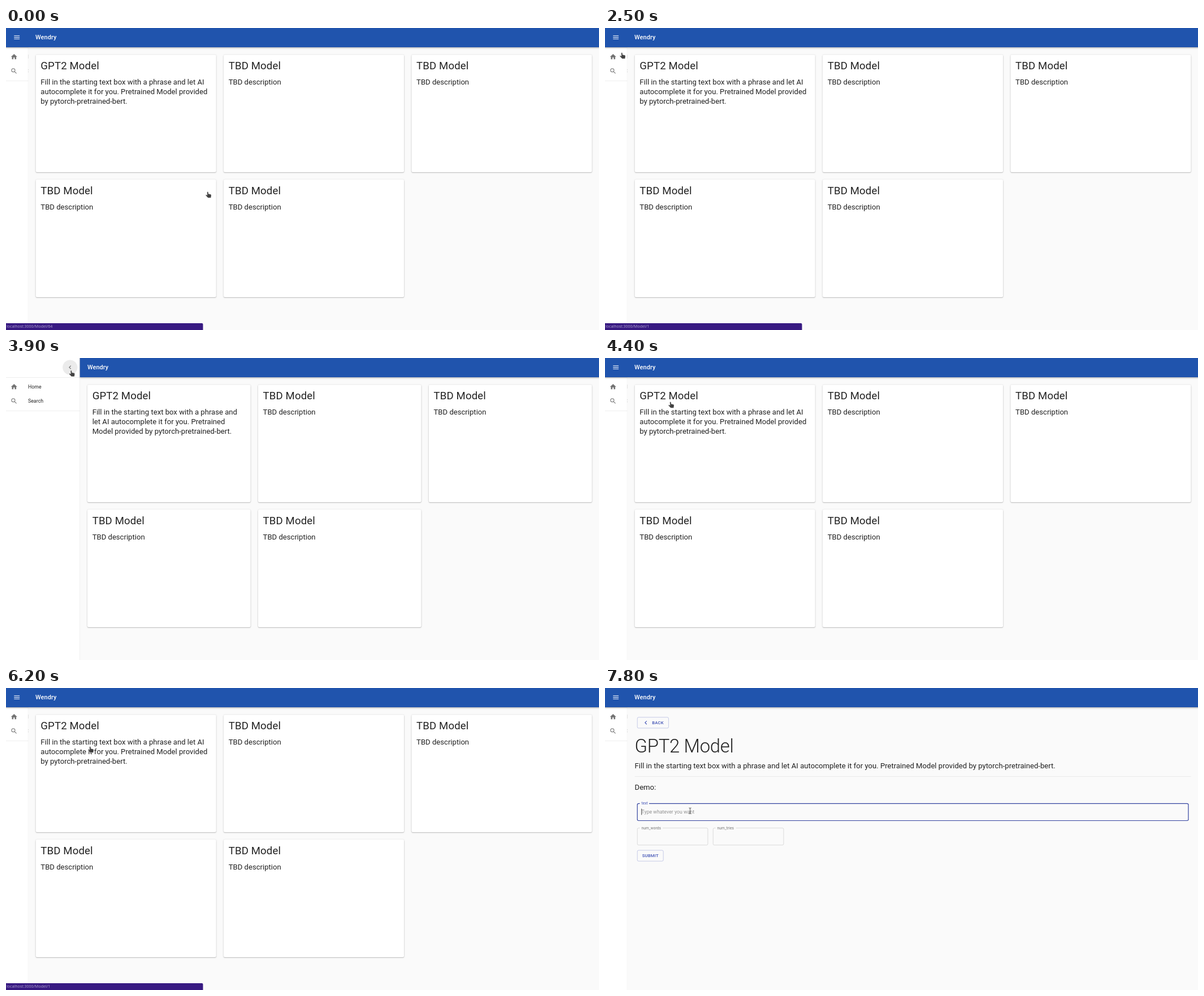
These frames come from a looping animation (1049x534 px, 8 s). An HTML page:

```html
<!DOCTYPE html>
<html lang="en">
<head>
<meta charset="utf-8">
<title>Model gallery</title>
<style>
  html, body { margin: 0; width: 100%; height: 100%; overflow: hidden; background: #fafafa; }
  #stage { display: block; width: 100vw; height: 100vh; font-family: Roboto, sans-serif; }
  #stage text { fill: rgba(0,0,0,.87); white-space: pre; }
  .h2 { font-size: 60px; font-weight: 300; letter-spacing: -.00833em; }
  .h4 { font-size: 34px; letter-spacing: .00735em; }
  .h5 { font-size: 24px; }
  .item { font-size: 16px; letter-spacing: .00938em; }
  .brand { font-size: 20px; font-weight: 500; letter-spacing: .0075em; }
  #stage .brand { fill: #fff; }
  .button { font-size: 14px; font-weight: 500; letter-spacing: .02857em; }
  #stage .button { fill: #3f51b5; }
  .label { font-size: 12px; letter-spacing: .00938em; }
  #stage .label { fill: rgba(0,0,0,.54); }
  .hint { font-size: 16px; }
  #stage .hint { fill: rgba(0,0,0,.42); }
  .card { fill: #fff; filter: drop-shadow(0 1px 1.5px rgba(0,0,0,.2)) drop-shadow(0 1.3px .6px rgba(0,0,0,.2)); }
  .bar { fill: #2054ad; filter: drop-shadow(0 2px 2px rgba(0,0,0,.2)) drop-shadow(0 2px 3px rgba(0,0,0,.14)); }
  .icon { fill: rgba(0,0,0,.54); }
  .rule { fill: #e0e0e0; }
  .line { fill: none; stroke: rgba(0,0,0,.23); }
  .edge { fill: none; stroke: rgba(63,81,181,.5); }
  #stage #url { font: 7px "Noto Sans", "Open Sans", sans-serif; fill: #a99bcb; }
</style>
</head>
<body>
<svg id="stage" viewBox="0 0 1049 534" preserveAspectRatio="none">
  <rect width="1049" height="534" fill="#fafafa"/>
  <!-- page units: a 1920 px wide window -->
  <g transform="translate(-.5 -1) scale(.547)">
    <g id="gallery"></g>

    <g id="detail">
      <rect class="edge" x="105.5" y="96.5" width="101" height="35" rx="4"/>
      <path fill="#3f51b5" transform="translate(121 102)" d="M15.41 7.41L14 6l-6 6 6 6 1.41-1.41L10.83 12z"/>
      <text class="button" x="153" y="119">BACK</text>
      <text class="h2" x="97" y="209.6">GPT2 Model</text>
      <text class="h5" id="about" x="97" y="261.5"></text>
      <rect class="rule" x="97" y="287" width="1799" height="1"/>
      <text class="h5" x="97" y="331">Demo:</text>
      <g id="fields"></g>
      <text class="hint" x="119" y="408">Type whatever you want</text>
      <rect id="caret" x="118.5" y="392" width="1.6" height="20" fill="#222"/>
      <rect class="edge" x="105.5" y="526.5" width="84" height="35" rx="4"/>
      <text class="button" x="121" y="549">SUBMIT</text>
    </g>

    <svg id="drawer" width="73" height="1000">
      <rect width="240" height="1000" fill="#fff"/>
      <g id="chevron">
        <circle id="halo" cx="208" cy="32" r="24" fill="rgba(0,0,0,.08)"/>
        <path class="icon" transform="translate(196 20)" d="M15.41 7.41L14 6l-6 6 6 6 1.41-1.41L10.83 12z"/>
      </g>
      <rect class="rule" y="64" width="240" height="1"/>
      <path class="icon" transform="translate(15 83)" d="M10 20v-6h4v6h5v-8h3L12 3 2 12h3v8z"/>
      <path class="icon" transform="translate(15 129)" d="M15.5 14h-.79l-.28-.27A6.47 6.47 0 0 0 16 9.5 6.5 6.5 0 1 0 9.5 16c1.61 0 3.09-.59 4.23-1.57l.27.28v.79l5 4.99L20.49 19l-4.99-5zm-6 0C7.01 14 5 11.99 5 9.5S7.01 5 9.5 5 14 7.01 14 9.5 11.99 14 9.5 14z"/>
      <text class="item" x="72" y="101">Home</text>
      <text class="item" x="72" y="147">Search</text>
      <rect class="rule" y="172" width="240" height="1"/>
      <rect class="rule" id="drawerEdge" width="1" height="1000"/>
    </svg>

    <g id="appBar">
      <rect class="bar" y="-8" width="1960" height="72"/>
      <path id="menu" fill="#fff" transform="translate(24 20)" d="M3 18h18v-2H3v2zm0-5h18v-2H3v2zm0-7v2h18V6H3z"/>
      <text class="brand" id="brand" y="39">Wendry</text>
    </g>
  </g>

  <g id="status">
    <path d="M0 522H346.5q2 0 2 2V534H0z" fill="#381a82"/>
    <text id="url" x="1" y="530.4"></text>
  </g>
  <path id="hand" fill="#414141" stroke="#fff" stroke-opacity=".6" stroke-width=".5"
    d="M2.7 1.3Q3.7-.3 4.8 1.2L5.1 4.3 8.9 5.1Q10.2 5.5 10.1 7L9.5 11.3H4.3L.3 7Q.2 5.7 1.5 5.9L3.1 6.7z"/>
  <path id="beam" fill="none" stroke="#555" stroke-width="1" d="M-2 .5Q0 .5 0 1.5Q0 .5 2 .5M0 1V10.5M-2 11Q0 11 0 10Q0 11 2 11"/>
</svg>

<script>
const LOOP = 8000;
const $ = id => document.getElementById(id);
const ABOUT = "Fill in the starting text box with a phrase and let AI autocomplete it for you. " +
  "Pretrained Model provided by pytorch-pretrained-bert.";

function add(parent, tag, attrs, text) {
  const el = document.createElementNS("http://www.w3.org/2000/svg", tag);
  for (const k in attrs) el.setAttribute(k, attrs[k]);
  if (text) el.textContent = text;
  return parent.appendChild(el);
}
const place = (el, x, y) => el.setAttribute("transform", `translate(${x} ${y})`);
const show = (el, on) => { el.style.display = on ? "" : "none"; };

// Gallery
const cards = [0, 1, 2, 3, 4].map(i => {
  const g = add($("gallery"), "g", {});
  const rect = add(g, "rect", { class: "card", height: 380, rx: 4 });
  add(g, "text", { class: "h4", x: 16, y: 135 - 88 }, i ? "TBD Model" : "GPT2 Model");
  const lines = [0, 1, 2, 3].map(n => add(g, "text", { class: "h5", x: 16, y: 97 + 31 * n }));
  return { g, rect, lines, text: i ? "TBD description" : ABOUT };
});

const pen = document.createElement("canvas").getContext("2d");
pen.font = "24px Roboto, sans-serif";
function wrap(text, width) {
  const out = [""];
  for (const word of text.split(" ")) {
    const last = out[out.length - 1];
    const next = last ? last + " " + word : word;
    if (last && pen.measureText(next).width > width) out.push(word);
    else out[out.length - 1] = next;
  }
  return out;
}

function layoutCards(drawerWidth) {
  const left = drawerWidth + 24, w = (1896 - left - 48) / 3;
  cards.forEach((c, i) => {
    place(c.g, left + (i % 3) * (w + 24), 88 + Math.floor(i / 3) * 404);
    c.rect.setAttribute("width", w);
    const rows = wrap(c.text, w - 32);
    c.lines.forEach((l, n) => { l.textContent = rows[n] || ""; });
  });
}

// Outlined inputs with a gap for the label
$("about").textContent = ABOUT;
const fields = [["text", 105, 375, 1783, 30], ["num_words", 105, 454, 229, 74], ["num_tries", 350, 454, 229, 66]]
  .map(([name, x, y, w, gap]) => ({
    x, y, w, gap,
    line: add($("fields"), "path", { class: "line" }),
    label: add($("fields"), "text", { class: "label", x: x + 14, y: y + 4 }, name)
  }));

function outline(f, open) {
  const x = f.x + .5, y = f.y + .5, r = x + f.w - 1, b = y + 55;
  return `M${x + 8 + f.gap * open} ${y}H${r - 4}q4 0 4 4V${b - 4}q0 4-4 4H${x + 4}q-4 0-4-4V${y + 4}q0-4 4-4H${x + 8}`;
}

// Timelines: [time, ...values]
const drawerKeys = [[0, 0], [3100, .98], [3300, 1], [4200, .64], [4400, 0]];
const statusKeys = [[0, "Model/64", 1], [1000, "", 0], [1400, "Model/1", 1], [1600, "Model/64", 1], [1900, "Model/1", 1],
  [3100, "", 0], [4600, "Model/1", .5], [4900, "Model/1", 1], [5600, "Search", 1], [6200, "Model/1", 1], [7000, "", 0]];
const glide = [[200, 353, 289], [700, 268, 235], [1100, 176, 166], [1300, 153, 160],
  [1600, 525, 150], [2000, 183, 82], [2500, 26, 43]];
const hops = [[2500, 26, 43], [3100, 19, 15], [3300, 64, 33], [3500, 106, 32], [3700, 111, 23], [3900, 111.5, 21.5],
  [4400, 112, 77], [4600, 113, 84], [4900, 112, 85], [5100, 113, 85], [5400, 51, 86], [5600, 33, 77],
  [5900, 11, 75], [6200, 145, 103], [6700, 149, 104], [7000, 150, 182], [7300, 150.5, 211.5]];

const held = (keys, t) => keys.reduce((a, k) => (k[0] <= t ? k : a));

function pointer(t) {
  if (t >= 2500) return held(hops, t).slice(1);
  if (t <= 200) return glide[0].slice(1);
  const i = glide.findIndex(k => k[0] > t), a = glide[i - 1], b = glide[i];
  const u = (t - a[0]) / (b[0] - a[0]);
  return [a[1] + (b[1] - a[1]) * u, a[2] + (b[2] - a[2]) * u];
}

function draw(now) {
  const t = Math.floor((now % LOOP) / 100) * 100;

  const p = held(drawerKeys, t)[1], width = 73 + 167 * p;
  const opened = t >= 3100 && t < 4200;
  $("drawer").setAttribute("width", width);
  $("drawerEdge").setAttribute("x", width - 1);
  place($("chevron"), width - 240, 0);
  show($("halo"), t >= 3700 && t < 4400);
  place($("appBar"), 240 * p, 0);
  show($("menu"), !opened);
  $("brand").setAttribute("x", opened ? 24 : 96);

  const detail = t >= 6500;
  show($("gallery"), !detail);
  show($("detail"), detail);
  if (!detail) layoutCards(width);
  else {
    fields.forEach(f => f.line.setAttribute("d", outline(f, t < 6700 ? .85 : 1)));
    const main = fields[0], focus = t >= 7600;
    main.line.style.stroke = t < 7300 ? "" : !focus ? "rgba(0,0,0,.87)" : t < 7800 ? "#2f3a80" : "#3444a0";
    main.line.style.strokeWidth = focus ? 2.2 : 1;
    main.label.style.fill = focus ? "#3f51b5" : "";
    show($("caret"), focus);
  }

  const [, path, alpha] = held(statusKeys, t);
  $("status").style.opacity = alpha;
  $("url").textContent = "localhost:3000/" + path;

  const [x, y] = pointer(t), typing = t >= 6700;
  show($("hand"), !typing);
  show($("beam"), typing);
  place(typing ? $("beam") : $("hand"), x, y);
}

const start = performance.now();
function tick() {
  draw(performance.now() - start);
  requestAnimationFrame(tick);
}
tick();
</script>
</body>
</html>
```
